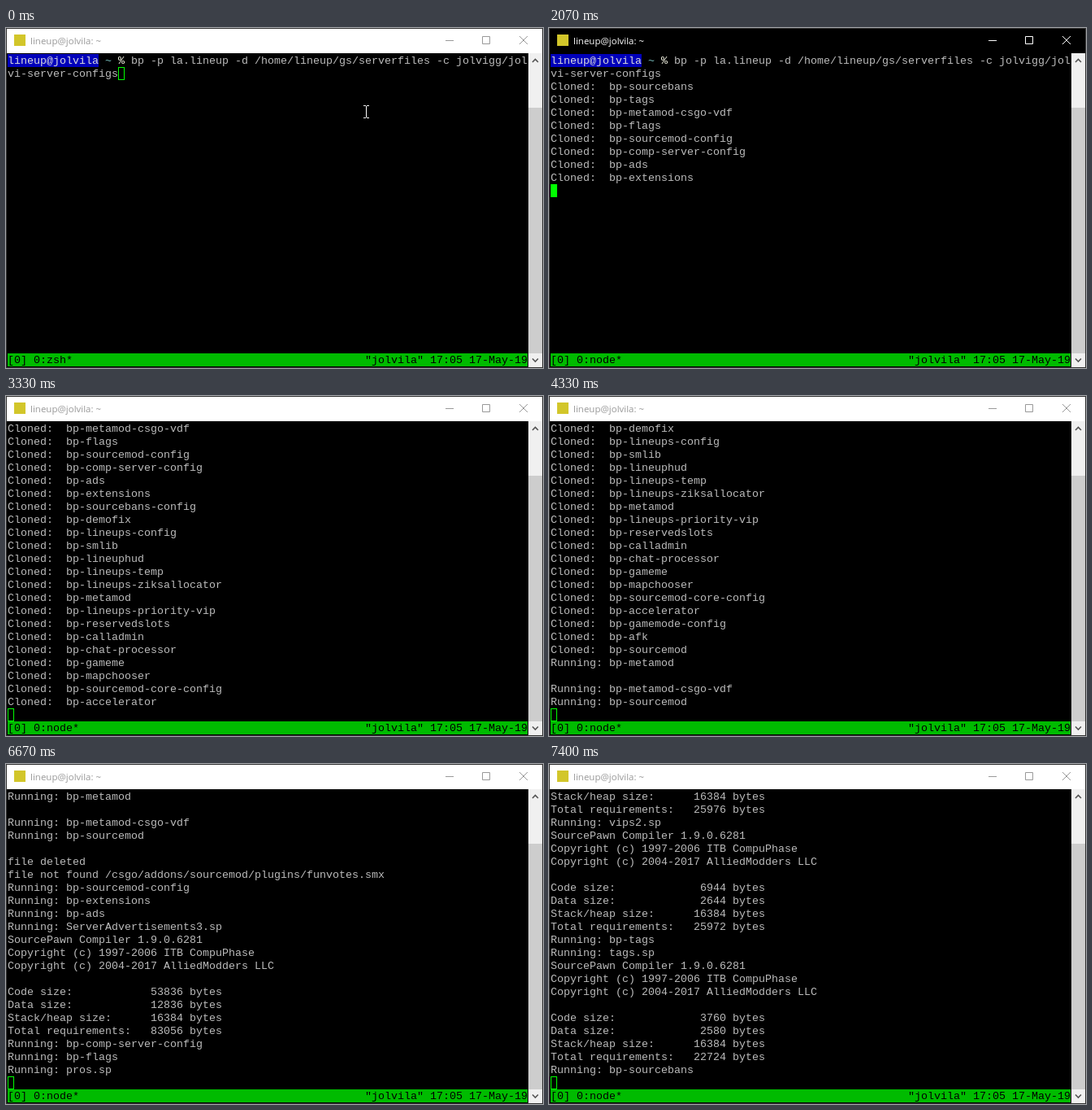
An HTML page for the animation above (8 s loop, 661x418 px).

```html
<!DOCTYPE html>
<html lang="en">
<head>
<meta charset="utf-8">
<title>Terminal</title>
<style>
  html, body { margin: 0; width: 100%; height: 100%; overflow: hidden; background: #000; }
  #win { position: absolute; left: 0; top: 0; width: 661px; height: 418px; background: #000; overflow: hidden;
    --bar: #fff; --ink: #999; }
  #win.active { --bar: #000; --ink: #fff; }
  #win div, #win svg { position: absolute; }
  #bar { left: 1px; top: 1px; width: 659px; height: 30px; background: var(--bar); }
  #icon { left: 10px; top: 8px; width: 14px; height: 14px; background: #d2c62a; }
  #name { left: 30px; top: 7px; font: 11.5px/17px "Open Sans", sans-serif; color: var(--ink); white-space: pre; }
  #edge { inset: 0; border: 1px solid #333; }
  .mono { font: 13.3333px/16px "Liberation Mono", monospace; white-space: pre; }
  #view { left: 2px; top: 32px; width: 640px; height: 368px; overflow: hidden; color: #bbb; }
  #text { left: 0; top: 0; padding-top: 1px; }
  .user { display: inline-block; position: relative; top: -1px; height: 16px; line-height: 18px;
    vertical-align: top; background: #00b; color: #ddd; }
  .path { color: #7bb; }
  .sign { color: #ffe; }
  #caret { width: 8px; height: 16px; box-sizing: border-box; border: 1px solid #0f0; }
  #win.active #caret { background: #0f0; }
  #status { left: 2px; top: 400px; width: 640px; height: 16px; line-height: 18px; background: #0b0; color: #000; }
  #clock { right: 0; top: 0; }
  #scroll { left: 643px; top: 31px; width: 17px; height: 386px; background: #f0f0f0; }
  #thumb { left: 0; top: 67px; width: 17px; height: 302px; background: #cdcdcd; }
  svg { left: 0; top: 0; fill: none; }
</style>
</head>
<body>
<div id="win">
  <div id="bar"></div>
  <div id="icon"></div>
  <div id="name">lineup@jolvila: ~</div>
  <div id="view" class="mono"><div id="text"><span class="user">lineup@jolvila</span> <span class="path">~</span> <span class="sign">%</span> bp -p la.lineup -d /home/lineup/gs/serverfiles -c jolvigg/jol
vi-server-configs
<span id="out"></span></div></div>
  <div id="caret"></div>
  <div id="status" class="mono"><span id="job"></span><div id="clock">"jolvila" 17:05 17-May-19</div></div>
  <div id="scroll"><div id="thumb"></div></div>
  <div id="edge"></div>
  <svg width="661" height="418">
    <g stroke="var(--ink)">
      <path d="M541 15.5h10M586.5 10.5h9v9h-9z"/>
      <path d="M632 10l10 10M642 10l-10 10"/>
    </g>
    <path d="M648 42l3.5-3.5 3.5 3.5M648 406.5l3.5 3.5 3.5-3.5" stroke="#555" stroke-width="1.6"/>
    <path id="beam" d="M0 95.5h3M4 95.5h3M3.5 96v14M0 110.5h3M4 110.5h3" stroke="#fff"/>
  </svg>
</div>
<script>
const LOOP = 8000, ROWS = 23, HEAD = 2;
const $ = id => document.getElementById(id);

const cloned = names => names.split(' ').map(n => 'Cloned:  bp-' + n);
const run = name => 'Running: ' + name;
const size = (label, n) => label.padEnd(22) + String(n).padStart(5) + ' bytes';
const compile = (code, data) => [
  'SourcePawn Compiler 1.9.0.6281',
  'Copyright (c) 1997-2006 ITB CompuPhase',
  'Copyright (c) 2004-2017 AlliedModders LLC',
  '',
  size('Code size:', code),
  size('Data size:', data),
  size('Stack/heap size:', 16384),
  size('Total requirements:', code + data + 16384)
];

const lines = [
  ...cloned('sourcebans tags metamod-csgo-vdf flags sourcemod-config comp-server-config ads extensions ' +
    'sourcebans-config demofix lineups-config smlib lineuphud lineups-temp lineups-ziksallocator ' +
    'metamod lineups-priority-vip reservedslots calladmin chat-processor gameme mapchooser ' +
    'sourcemod-core-config accelerator gamemode-config afk sourcemod'),
  run('bp-metamod'), '', run('bp-metamod-csgo-vdf'), run('bp-sourcemod'), '',
  'file deleted',
  'file not found /csgo/addons/sourcemod/plugins/funvotes.smx',
  run('bp-sourcemod-config'), run('bp-extensions'), run('bp-ads'),
  run('ServerAdvertisements3.sp'), ...compile(53836, 12836),
  run('bp-comp-server-config'), run('bp-flags'),
  run('pros.sp'), ...compile(6940, 2640),
  run('vips.sp'), ...compile(6948, 2644),
  run('vips2.sp'), ...compile(6944, 2644),
  run('bp-tags'), run('tags.sp'), ...compile(3760, 2580),
  run('bp-sourcebans')
];

// [time, number of output lines]; -1 means the command is not sent yet
const output = [
  [0, -1], [330, 0], [1530, 1], [1600, 2], [1670, 3], [1800, 4], [1870, 6], [1930, 7],
  [2000, 8], [2130, 10], [2200, 11], [2530, 12], [2600, 13], [2670, 14], [2730, 15],
  [3000, 17], [3070, 19], [3130, 20], [3200, 22], [3330, 24], [3600, 27], [3930, 28],
  [4330, 31], [6070, 34], [6130, 38], [6670, 49], [6870, 58], [7070, 67], [7200, 77], [7400, 86]
];
const pointer = [[0, 440], [600, 439], [730, 438], [870, 436], [1270, 435], [1470, null]];

const at = (track, t) => track.findLast(([start]) => start <= t)[1];

function draw(t) {
  const n = at(output, t), x = at(pointer, t);
  const row = HEAD + Math.max(n, 0), scroll = Math.max(0, row - ROWS + 1);
  const [cx, cy] = n < 0 ? [17, 1] : [0, row - scroll];
  $('win').className = t >= 70 && t < 2600 ? 'active' : '';
  $('out').textContent = lines.slice(0, Math.max(n, 0)).join('\n');
  $('text').style.top = -16 * scroll + 'px';
  $('caret').style.left = 2 + 8 * cx + 'px';
  $('caret').style.top = 32 + 16 * cy + 'px';
  $('job').textContent = t < 1470 ? '[0] 0:zsh*' : '[0] 0:node*';
  $('beam').style.display = x === null ? 'none' : '';
  $('beam').setAttribute('transform', `translate(${x || 0} 0)`);
}

const begin = performance.now();
function tick() {
  draw((performance.now() - begin) % LOOP);
  requestAnimationFrame(tick);
}
tick();
</script>
</body>
</html>
```
